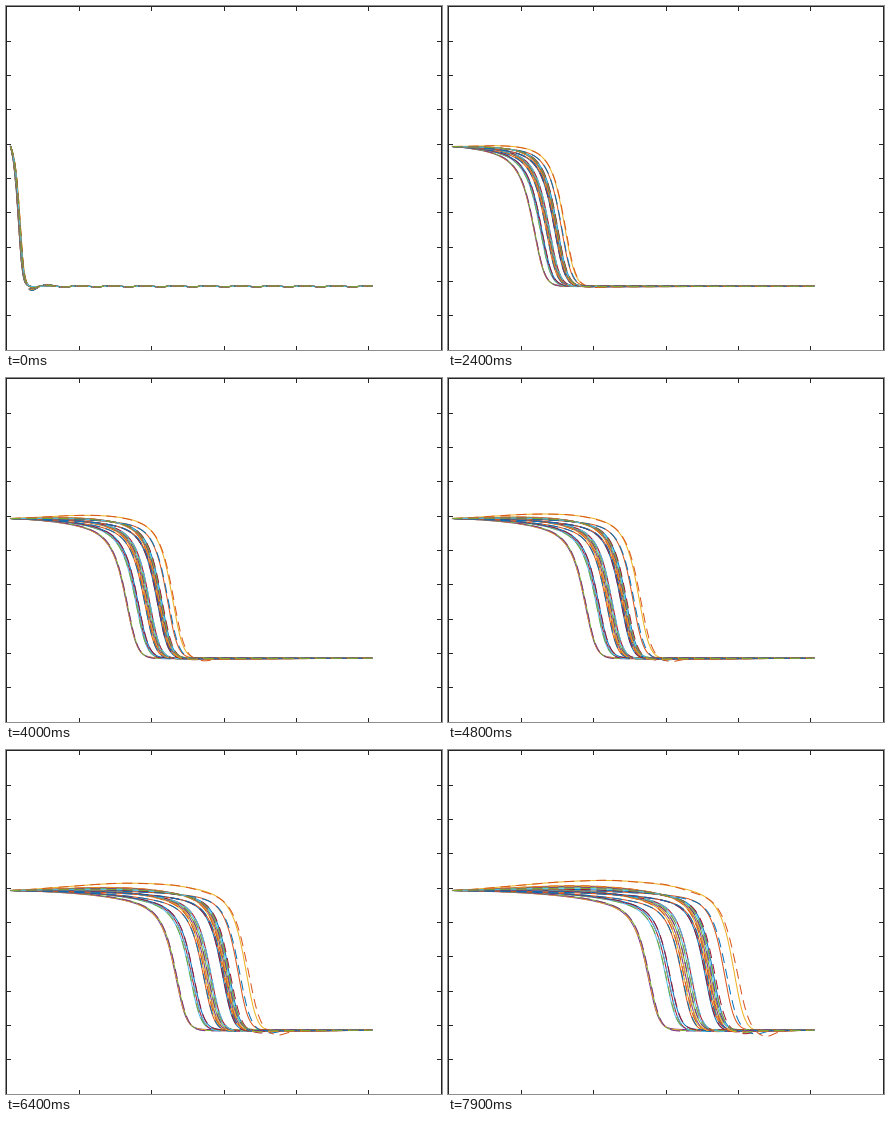
These frames come from a looping animation (436 px wide and 344 px high, 8000 ms). A matplotlib script:

```python
import numpy as np
import matplotlib.pyplot as plt
from matplotlib.animation import FuncAnimation

W, H = 436, 344
FRAMES, STEP = 80, 100
PX = 0.72  # one pixel in points at 100 dpi
INK = "#262626"
COLORS = ["#0072BD", "#D95319", "#EDB120", "#7E2F8E",
          "#77AC30", "#4DBEEE", "#A2142F"]
TOP, FLOOR, X0, X1 = 140.5, 280.3, 4.5, 366

N = 20
rng = np.random.default_rng(4)
rank = (np.arange(N) + 17) % N  # slowest front first
share = rank / (N - 1)
# fronts end in a slow pair, two bundles and two fast ones
ENDS = np.interp(rank, [0, 1, 2, 4, 5, 10, 11, 17, 18, 19],
                 [199.5, 200.5, 217, 221, 233, 242, 256, 264, 275, 285])
TAIL = 0.2 - 0.12 * share
BUMP = 12 * share * ((17 * rank + 16) % N) / (N - 1)
ERR = 0.1 + 0.9 * share ** 8
DRIFT = rng.uniform(-1.2, 1.5, N)
RING = rng.uniform(0.2, 1, N)

x = np.linspace(X0, X1, 500)


def front(end, t):
    """Front position: a quick start that settles to a constant speed."""
    k = end - 200
    start, speed = 12 + 0.02 * k, 20.3 + 0.121 * k
    lead = end - start - 7.9 * speed
    return start + speed * t + lead * (1 - np.exp(-t / (1 - 0.0035 * k)))


def curve(i, t, dashed):
    m = front(ENDS[i], t)
    grow = t / 7.9
    err = ERR[i] * grow ** 1.5 if dashed else 0

    # steep drop, halfway down at m
    w = (4.5 - 2.7 * np.exp(-t / 0.7)) * (1 + 0.15 * err)
    z = np.clip((x - m - 3 * err) / w, -60, 60)
    s = (1 + 3 * np.exp(-z)) ** -0.5
    s = (s - s[0]) / (1 - s[0])

    # slow sag ahead of the drop, and the rising plateau
    sag = TAIL[i] * np.exp(np.minimum(x - m, 0) / (20 + 0.2 * m))
    s = s + (1 - s) * (sag - sag[0])
    y = TOP + (FLOOR - TOP) * s
    u = np.clip((x - X0) / (m - X0), 0, 1)
    y -= BUMP[i] * grow ** 1.2 * np.sin(np.pi * u ** 1.3)
    y += DRIFT[i] * grow * s ** 8 * (X1 - x) / (X1 - m)

    # ringing past the front, fading with time
    amp = 0.5
    if dashed:
        y += 6 * err * np.exp(-((x - m - 32) / 11) ** 2)
        y += 1.5 * err * np.sin((x - m) / 9) * u ** 3 * (x < m + 28)
        amp = amp + 5 * RING[i] * np.exp(-np.maximum(x - m - 10, 0) / 14)
    fade = np.exp(-t / 0.6) / (1 + np.exp(np.clip((m + 9 - x) / 1.2, -50, 50)))
    return y + amp * fade * np.cos(2 * np.pi * (x - 26) / 32)


fig = plt.figure(figsize=(W / 100, H / 100), dpi=100, facecolor="white")
ax = fig.add_axes([0, 0, 1, 1])
ax.set_xlim(0, W)
ax.set_ylim(H, 0)
ax.axis("off")


def rule(xs, ys):
    ax.plot(xs, ys, color=INK, lw=PX, solid_capstyle="butt", snap=False)


rule([0.5, 0.5], [0, H])
rule([W - 0.5, W - 0.5], [0, H])
rule([0, W], [0.5, 0.5])
for k in range(1, 6):
    p = int(72.46 * k + 0.65) + 0.5
    rule([p, p], [0, 5])
    rule([p, p], [H - 4, H])
for k in range(1, 10):
    p = int(34.33 * k + 0.75) + 0.5
    rule([0, 5], [p, p])
    rule([W - 5, W], [p, p])

solid = [ax.plot([], [], color=COLORS[i % 7], lw=PX)[0] for i in range(N)]
dashes = [ax.plot([], [], color=COLORS[(i + N) % 7], lw=PX,
                  ls=(0, (10, 6)))[0] for i in range(N)]


def draw(frame):
    t = frame * STEP / 1000
    for i in range(N):
        solid[i].set_data(x, curve(i, t, False))
        dashes[i].set_data(x, curve(i, t, True))
    return solid + dashes


anim = FuncAnimation(fig, draw, frames=FRAMES, interval=STEP, repeat=True,
                     repeat_delay=0, blit=False)
plt.show()
```
